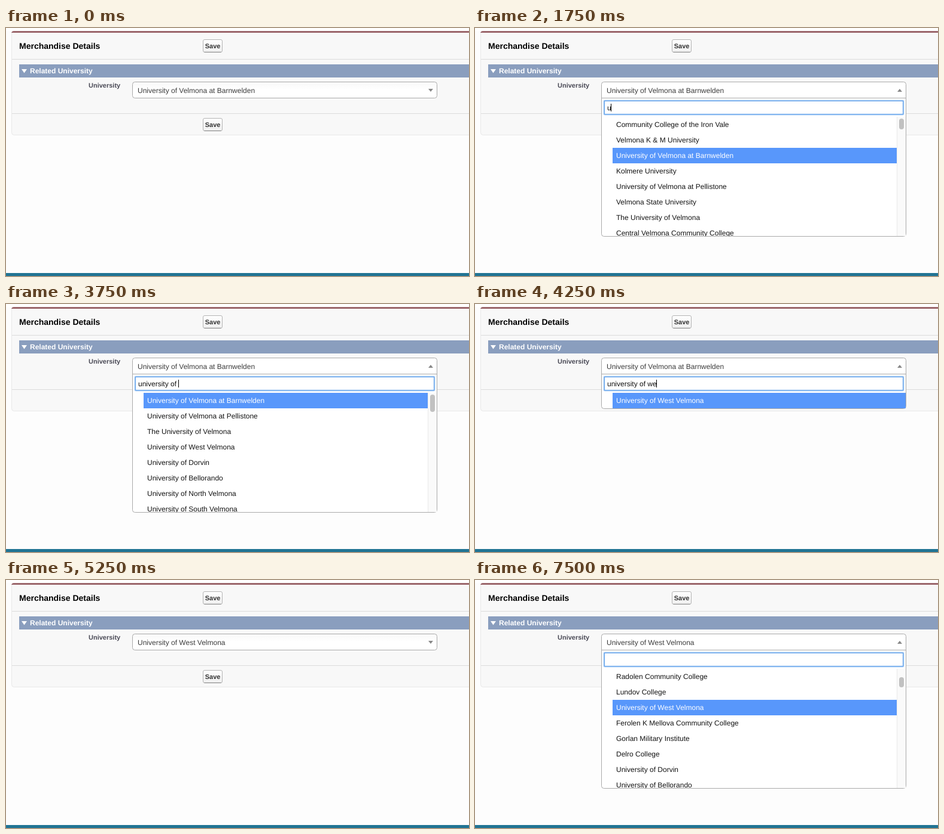
These frames come from a looping animation (774 by 416 pixels, 8 s). An HTML page:

```html
<!DOCTYPE html>
<html lang="en">
<head>
<meta charset="utf-8">
<title>Merchandise Details</title>
<style>
html, body { margin: 0; width: 100%; height: 100%; overflow: hidden; background: #fdfdfd; }
svg { display: block; font: 12px "Liberation Sans", Arial, sans-serif; text-rendering: geometricPrecision; }
.bold { font-weight: bold; }
.small { font-weight: bold; font-size: 11px; }
.rule { fill: #dcdcdc; }
.box { fill: #fff; stroke: #aaa; }
.row { fill: #151515; }
.row.active { fill: #fff; }
</style>
</head>
<body>
<svg width="774" height="416" viewBox="0 0 774 416">
  <defs>
    <linearGradient id="buttonFill" x2="0" y2="1">
      <stop stop-color="#fff"/><stop offset="1" stop-color="#efefef"/>
    </linearGradient>
    <linearGradient id="selectFill" x2="0" y2="1">
      <stop stop-color="#f8f8f8"/><stop offset=".5" stop-color="#fff"/>
    </linearGradient>
    <clipPath id="listClip"><rect x="212" y="149" width="508" height="200"/></clipPath>
    <g id="save">
      <rect x=".5" y=".5" width="32" height="21" rx="2.5" fill="url(#buttonFill)" stroke="#b4b4b4"/>
      <path d="M2.5 21.5H30.5" stroke="#7f7f7f"/>
      <text class="small" x="3.7" y="15" fill="#333">Save</text>
    </g>
  </defs>

  <rect width="774" height="416" fill="#fdfdfd"/>
  <rect width="774" height="5" fill="#fff"/>
  <path d="M780 5.5H13.5Q9.5 5.5 9.5 9.5V175.5Q9.5 179.5 13.5 179.5H780" fill="#f8f8f8" stroke="#e8e8e8"/>
  <path d="M774 5H13Q10 5 9 8H774Z" fill="#9b666b"/>
  <rect class="rule" x="10" y="52" width="764" height="1"/>
  <rect class="rule" x="10" y="143" width="764" height="1"/>
  <rect y="411" width="774" height="5" fill="#217494"/>

  <text class="bold" x="22" y="35" font-size="14">Merchandise Details</text>
  <use href="#save" x="329" y="19"/>
  <use href="#save" x="329" y="151"/>
  <rect x="22" y="61" width="752" height="22" fill="#8a9ebe"/>
  <path d="M26 69H35L30.5 75.5Z" fill="#fff"/>
  <text class="bold" x="40" y="76" fill="#fff">Related University</text>
  <text class="small" x="138" y="100" fill="#4a4a56">University</text>

  <g id="closed">
    <rect x="211.5" y="90.5" width="509" height="27" rx="4" fill="url(#selectFill)" stroke="#aaa"/>
    <path d="M706 102H714L710 107Z" fill="#888"/>
  </g>
  <g id="open">
    <path id="frame" class="box"/>
    <path d="M212 117.5H720" stroke="#aaa"/>
    <path d="M706 107H714L710 102Z" fill="#888"/>
    <rect x="215.5" y="121.5" width="501" height="24" rx="2" fill="none" stroke="#a9cdf6" stroke-width="2"/>
    <rect x="216.5" y="122.5" width="499" height="22" fill="#fff" stroke="#5b9de8"/>
    <text id="query" x="221" y="138" fill="#111" xml:space="preserve"></text>
    <rect id="caret" y="127" width="1" height="13" fill="#000"/>
    <g clip-path="url(#listClip)">
      <rect id="highlight" x="230" height="26" fill="#5897fb"/>
      <g id="rows"></g>
    </g>
    <g id="scrollbar">
      <rect x="705" y="149" width="15" height="200" fill="#fafafa"/>
      <rect x="705" y="149" width="1" height="200" fill="#e9e9e9"/>
      <rect id="thumb" x="709" width="8" rx="4" fill="#c1c1c1"/>
    </g>
  </g>
  <text id="value" x="220" y="109" fill="#3c3c3c"></text>
</svg>

<script>
const $ = id => document.getElementById(id);
const LOOP = 8000;
const ROW = 26;

const main = "University of Velmona at Barnwelden";
const west = "University of West Velmona";
const shared = [
  "Velmona K & M University", main, "Kolmere University",
  "University of Velmona at Pellistone", "Velmona State University",
  "The University of Velmona"
];

// Each list: rows, index of the active row, scroll thumb [top, height].
const lists = {
  all: { rows: ["Community College of the Iron Vale", ...shared, "Central Velmona Community College"],
         active: 2, thumb: [152, 18] },
  university: { rows: [...shared, "Vensar State University", "Kesdor University-Hendermoor"],
                active: 1, thumb: [152, 18] },
  universityOf: { rows: [main, "University of Velmona at Pellistone", "The University of Velmona", west,
                         "University of Dorvin", "University of Bellorando",
                         "University of North Velmona", "University of South Velmona"],
                  active: 0, thumb: [152, 29] },
  single: { rows: [west], active: 0 },
  reopened: { rows: ["Radolen Community College", "Lundov College", west,
                     "Ferolen K Mellova Community College", "Gorlan Military Institute",
                     "Delro College", "University of Dorvin", "University of Bellorando"],
              active: 2, thumb: [163, 17] }
};

// Steps: start time, chosen value, list name, typed text, caret shown.
const steps = [
  [0, main],
  [500, main, "all", "", true],
  [1000, main, "all", "", false],
  [1500, main, "all", "", true],
  [1750, main, "all", "u", true],
  [2000, main, "all", "uni", true],
  [2250, main, "university", "unive", true],
  [2500, main, "university", "univers", true],
  [2750, main, "university", "universit", true],
  [3000, main, "university", "university", true],
  [3250, main, "universityOf", "university o", true],
  [3500, main, "universityOf", "university of", true],
  [3750, main, "universityOf", "university of ", true],
  [4250, main, "single", "university of we", true],
  [4500, main, "single", "university of west", true],
  [5000, main, "single", "university of west", false],
  [5250, west],
  [7000, west, "reopened", "", true],
  [7500, west, "reopened", "", false]
];

const pen = document.createElement("canvas").getContext("2d");
pen.font = '12px "Liberation Sans", Arial, sans-serif';

const show = (id, on) => $(id).setAttribute("visibility", on ? "inherit" : "hidden");
const set = (id, attrs) => {
  for (const [key, value] of Object.entries(attrs)) $(id).setAttribute(key, value);
};

function drawList({ rows, active, thumb }) {
  const bottom = thumb ? 349.5 : 175.5;
  set("frame", { d: `M211.5 94.5Q211.5 90.5 215.5 90.5H716.5Q720.5 90.5 720.5 94.5V${bottom - 4}` +
                    `Q720.5 ${bottom} 716.5 ${bottom}H215.5Q211.5 ${bottom} 211.5 ${bottom - 4}Z` });
  set("highlight", { y: 149 + active * ROW, width: thumb ? 475 : 490 });
  show("scrollbar", thumb);
  if (thumb) set("thumb", { y: thumb[0], height: thumb[1] });
  $("rows").replaceChildren(...rows.map((name, i) => {
    const text = document.createElementNS("http://www.w3.org/2000/svg", "text");
    text.setAttribute("class", i === active ? "row active" : "row");
    text.setAttribute("x", 236);
    text.setAttribute("y", 166 + i * ROW);
    text.textContent = name;
    return text;
  }));
}

function draw([, value, list, query = "", caret]) {
  $("value").textContent = value;
  show("closed", !list);
  show("open", list);
  if (!list) return;
  drawList(lists[list]);
  $("query").textContent = query;
  set("caret", { x: Math.floor(221 + pen.measureText(query).width) });
  show("caret", caret);
}

let current;
function tick() {
  const time = performance.now() % LOOP;
  const step = steps.findLast(([start]) => start <= time);
  if (step !== current) draw(current = step);
  requestAnimationFrame(tick);
}
tick();
</script>
</body>
</html>
```
